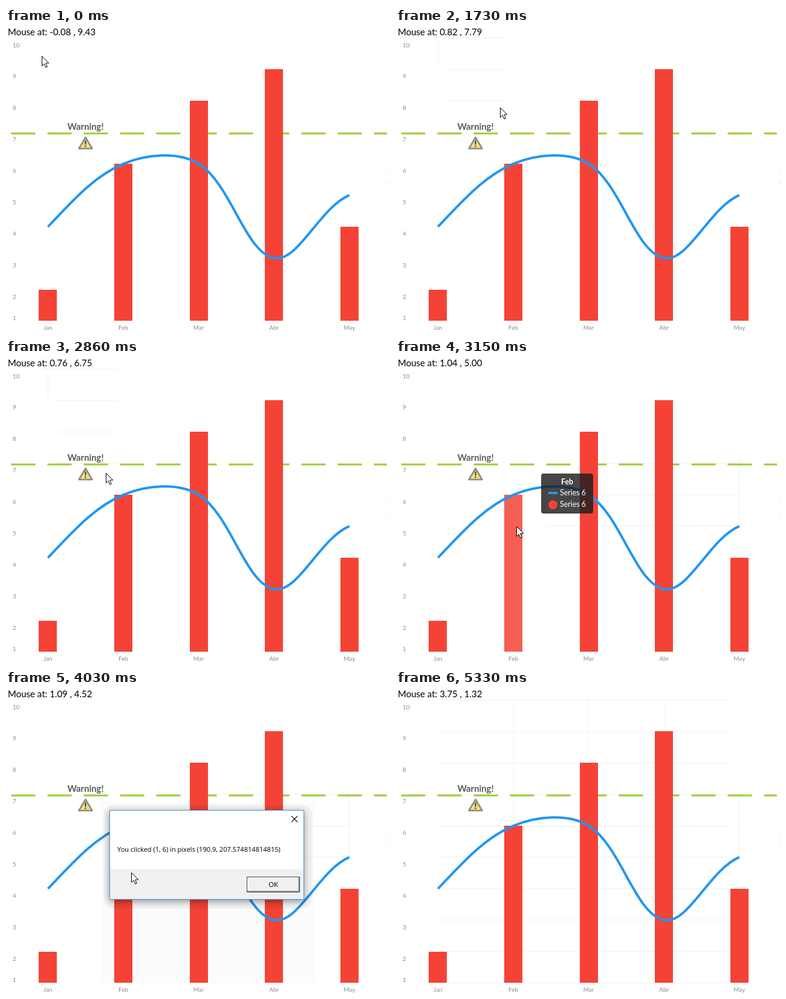
An HTML page with a canvas that plays this animation: 635x500 px, repeating every 6.26 s.

```html
<!DOCTYPE html>
<html lang="en">
<head>
<meta charset="utf-8">
<title>Chart with mouse events</title>
<style>
html, body { margin: 0; width: 100%; height: 100%; overflow: hidden; background: #fff; }
canvas { display: block; }
</style>
</head>
<body>
<canvas id="stage" width="635" height="500"></canvas>
<script>
const c = document.getElementById('stage').getContext('2d');
const LOOP = 6260, HOVER = 3000, OPEN = 3640, PRESS = 4920, CLOSE = 5110, END = 5330;
const RED = '#f44336', BLUE = '#2196f3', GREY = '#8c8c8c';
const sans = 'Lato, Carlito, sans-serif', ui = '"Open Sans", "Noto Sans", sans-serif';
const months = ['Jan', 'Feb', 'Mar', 'Abr', 'May'];
const bars = [2, 6, 8, 9, 4], curve = [4, 6, 6, 3, 5];
const px = i => 69.4 + i * 124.6, py = v => 16.5 + (10 - v) * 51.89;
const clamp = k => Math.min(1, Math.max(0, k));
const mix = (a, b, k = 0.5) => a + (b - a) * k;
const mixPt = (a, b, k) => [mix(a[0], b[0], k), mix(a[1], b[1], k)];

// Pointer moves: start, end, then where it goes in chart units
const moves = [
  [150, 710, 0.03, 9.95], [810, 1030, 0.13, 10.09], [1180, 1550, 0.82, 7.79],
  [1730, 2340, 0.76, 6.75], [2830, 3120, 1.04, 5], [3160, 3390, 1.09, 4.52],
  [4020, 4250, 3.05, 3.88], [4470, 4580, 3.75, 4.79], [CLOSE, 5290, 3.75, 1.32]
];

function pointerAt(t) {
  let at = [-0.08, 9.43];
  for (const [from, to, ...dest] of moves) {
    const k = clamp((t - from) / (to - from));
    at = mixPt(at, dest, k * k * (3 - 2 * k));
  }
  return at;
}

function text(s, x, y, font, color, align = 'left') {
  c.font = font;
  c.fillStyle = color;
  c.textAlign = align;
  c.fillText(s, x, y);
}

function rect(x, y, w, h, color) {
  c.fillStyle = color;
  c.fillRect(x, y, w, h);
}

function round(x, y, w, h, r, color) {
  c.beginPath();
  c.roundRect(x, y, w, h, r);
  c.fillStyle = color;
  c.fill();
}

function stroke(color, width) {
  c.strokeStyle = color;
  c.lineWidth = width;
  c.stroke();
}

function shape(points, fill, edge, width) {
  c.beginPath();
  points.forEach(p => c.lineTo(...p));
  c.closePath();
  c.fillStyle = fill;
  c.fill();
  stroke(edge, width);
}

function line(color, width, ...points) {
  c.beginPath();
  points.forEach(p => c.lineTo(...p));
  stroke(color, width);
}

// Grid lines show only in areas (left, top, right, bottom) repainted by time t
function gridAreas(t, x, y) {
  if (t < 150) return [];
  if (t < HOVER) {
    const trail = [84, 2, Math.max(x + 12, t < 1730 ? 145 : 184), y + 19];
    return [[58, 2, 145, 65], ...(t < 1180 ? [] : [trail])];
  }
  if (t < CLOSE) return [[324, 163, 569, 277], [250, 270, 324, 277]];
  return [[72, 2, 548, 486], [560, 163, 569, 276]];
}

function grid(areas) {
  c.save();
  c.beginPath();
  for (const [l, t, r, b] of areas) c.rect(l, t, r - l, b - t);
  c.clip();
  for (let v = 1; v <= 10; v++) rect(58, Math.floor(py(v)), 511, 1, '#f1f1f1');
  for (let i = 0; i < 5; i++) rect(Math.floor(px(i)), 16, 1, 468, '#f1f1f1');
  c.restore();
}

function smoothLine() {
  // One unseen value at each end sets the slope there
  const pts = [1, ...curve, 5].map((v, i) => [px(i - 1), py(v)]);
  const len = (a, b) => Math.hypot(a[0] - b[0], a[1] - b[1]);
  const control = (p, m, s) => [p[0] + (m[0] - s[0]) * 0.7, p[1] + (m[1] - s[1]) * 0.7];
  c.beginPath();
  c.moveTo(...pts[1]);
  for (let i = 1; i < curve.length; i++) {
    const [p0, p1, p2, p3] = pts.slice(i - 1, i + 3);
    const m = mixPt(p1, p2), l1 = len(p0, p1), l2 = len(p1, p2), l3 = len(p2, p3);
    const s1 = mixPt(mixPt(p0, p1), m, l1 / (l1 + l2));
    const s2 = mixPt(m, mixPt(p2, p3), l2 / (l2 + l3));
    c.bezierCurveTo(...control(p1, m, s1), ...control(p2, m, s2), ...p2);
  }
  stroke(BLUE, 4);
}

function warning() {
  text('Warning!', 131.5, 168, 'bold 14.8px ' + sans, '#5a5a5a', 'center');
  c.lineJoin = 'round';
  shape([[131.5, 180.5], [142.5, 199], [120.5, 199]], '#f3e07c', '#8b8b86', 2.6);
  c.lineJoin = 'miter';
  rect(130.3, 185.5, 2.4, 7, '#55524a');
  rect(130.3, 194, 2.4, 2.4, '#55524a');
}

function chart(t, x, y) {
  if (t >= OPEN && t < CLOSE) rect(158, 183, 352, 300, '#fcfcfc');
  grid(gridAreas(t, x, y));
  c.setLineDash([40, 20]);
  line('#9acd32', 3, [8.5, 174], [630, 174]);
  c.setLineDash([]);
  bars.forEach((v, i) => {
    const hover = i === 1 && t >= HOVER && t < OPEN, top = Math.round(py(v));
    rect(Math.round(px(i) - 15), top, 30, 483 - top, hover ? '#f65f54' : RED);
  });
  smoothLine();
  warning();
  for (let v = 1; v <= 10; v++)
    text(v, 11, Math.min(py(v) + 15, 481.5), '10px ' + sans, GREY);
  months.forEach((s, i) => text(s, px(i), 498, '10px ' + sans, GREY, 'center'));
  rect(634, 236, 1, 2, '#ccc');
  rect(634, 255, 1, 2, '#ccc');
}

function tooltip(t) {
  if (t < HOVER || t >= CLOSE) return;
  const k = clamp((t - HOVER) / 390);
  c.save();
  c.globalAlpha = clamp(k * 3);
  c.translate(Math.round(mix(483, 200, 1 - (1 - k) ** 4)), Math.round(mix(163, 230, k)));
  round(0, 0, 86, 66, 4, 'rgba(30,30,30,.82)');
  text('Feb', 43, 18, 'bold 12.3px ' + sans, '#fff', 'center');
  rect(12, 30, 15, 4, BLUE);
  round(12, 44, 15, 15, 7.5, RED);
  text('Series 6', 31, 36, '12.4px ' + sans, '#fff');
  text('Series 6', 31, 55, '12.4px ' + sans, '#fff');
  c.restore();
}

function shadow() {
  c.save();
  c.beginPath();
  c.rect(0, 0, 635, 500);
  c.rect(171, 198, 322, 148);
  c.clip('evenodd');
  round(161, 189, 346, 172, 18, 'rgba(0,0,0,.045)');
  c.shadowColor = 'rgba(0,0,0,.4)';
  c.shadowBlur = 10;
  c.shadowOffsetY = 3;
  rect(171, 198, 322, 148, '#fff');
  c.restore();
}

function button(pressed) {
  const [lit, dim] = pressed ? [GREY, '#f0f0f0'] : ['#fff', GREY];
  c.beginPath();
  c.rect(398.5, 308.5, 87, 25);
  stroke('#404040', 1);
  line(lit, 1, [399.5, 333], [399.5, 309.5], [485, 309.5]);
  line(dim, 1.5, [399, 332.3], [484.3, 332.3], [484.3, 309]);
  text('OK', 442, 325, '11.3px ' + ui, '#000', 'center');
}

function dialog(t) {
  if (t < OPEN || t >= END) return;
  const q = t < CLOSE ? clamp((t - OPEN + 20) / 220) : (END - t) / (END - CLOSE);
  const k = 1 - (1 - q) ** 3, size = mix(0.944, 1, k);
  c.save();
  c.globalAlpha = k;
  c.translate(332, 272);
  c.scale(size, size);
  c.translate(-332, -272);
  shadow();
  rect(172, 199, 320, 97, '#fff');
  rect(172, 296, 320, 49, '#f0f0f0');
  c.beginPath();
  c.rect(171.5, 198.5, 321, 147);
  stroke('#4a93cf', 1);
  line('#111', 1.1, [472, 208], [482, 218]);
  line('#111', 1.1, [482, 208], [472, 218]);
  text('You clicked (1, 6) in pixels (190.9, 207.574814814815)', 184, 267, '11.05px ' + ui, '#000');
  button(t >= PRESS);
  c.restore();
}

function pointer(x, y) {
  c.save();
  c.translate(x + 0.5, y + 0.5);
  shape([[0, 0], [0, 16], [3.7, 12.6], [6.3, 18.6], [8.8, 17.5], [6.2, 11.6], [11.3, 11.4]],
    '#fff', '#000', 1);
  c.restore();
}

function draw(t) {
  const [i, v] = pointerAt(t), x = Math.round(px(i)), y = Math.round(py(v));
  // The readout trails the pointer and freezes while the dialog is open
  const read = pointerAt(t >= OPEN && t < CLOSE ? OPEN : t - 30).map(n => n.toFixed(2));
  rect(0, 0, 635, 500, '#fff');
  chart(t, x, y);
  text('Mouse at: ' + read.join(' , '), 3, 12, '15px ' + sans, '#000');
  tooltip(t);
  dialog(t);
  if (t < END) pointer(x, y);
}

const start = performance.now();
function tick() {
  draw((performance.now() - start) % LOOP);
  requestAnimationFrame(tick);
}
tick();
</script>
</body>
</html>
```
